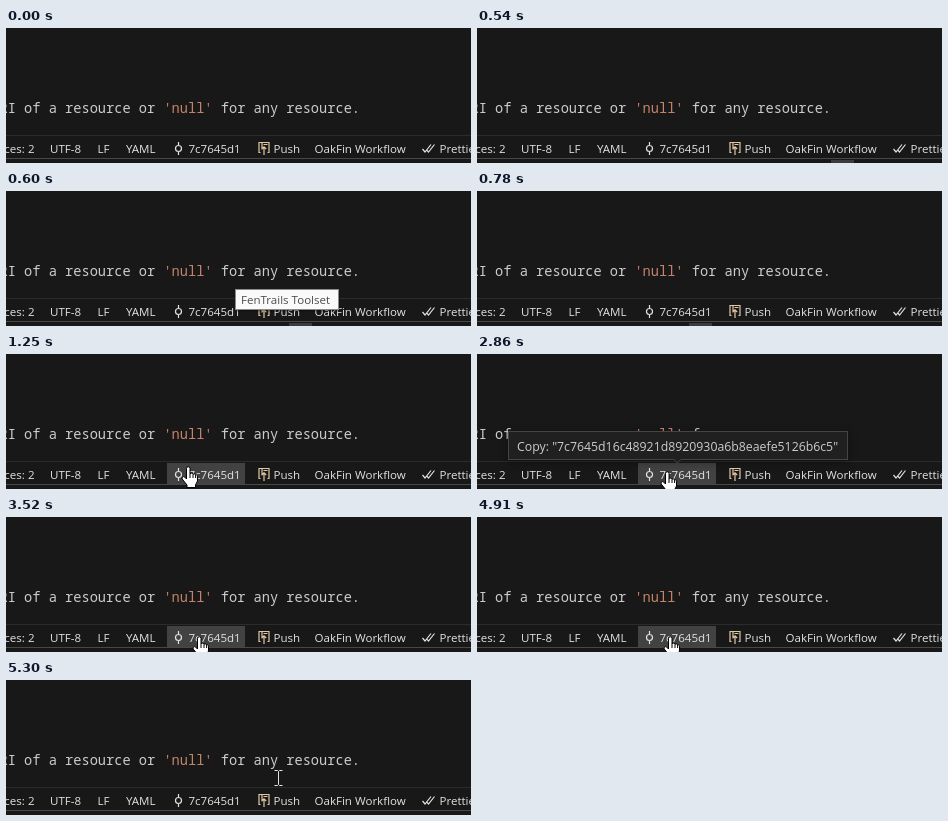
Recreate the animation shown at these times as an HTML page. Size 465x135 px, loop 5440 ms.

```html
<!DOCTYPE html>
<html lang="en">
<head>
<meta charset="utf-8">
<title>Status bar commit hash</title>
<style>
  html, body { margin: 0; width: 100%; height: 100%; overflow: hidden; background: #181818; }
  svg { display: block; }
  text { font: 11.55px "Open Sans", "Noto Sans", sans-serif; fill: #e2e2e2; white-space: pre; }
  .code { font: 13.67px "Noto Sans Mono", "DejaVu Sans Mono", monospace; fill: #ccc; }
  .str { fill: #c5836a; }
  .hash { font-size: 12.3px; fill: #ccc; }
  .line { fill: none; stroke: #e2e2e2; stroke-width: 1.2; }
  #copyTip rect { filter: drop-shadow(0 2px 4px rgba(0, 0, 0, .36)); }
</style>
</head>
<body>
<svg width="465" height="135" viewBox="0 0 465 135">
  <rect width="465" height="135" fill="#181818"/>
  <text class="code" x="-6.5" y="85">RI of a resource or <tspan class="str">'null'</tspan> for any resource.</text>

  <rect y="107" width="465" height="1" fill="#2b2b2b"/>
  <rect id="hover" x="161" y="109" width="78" height="21" fill="#424242"/>
  <rect y="130" width="465" height="1" fill="#484848"/>
  <rect id="slot" y="132" width="23" height="3" fill="#3c3c3c"/>

  <text x="28.5" y="125" text-anchor="end">Spaces: 2</text>
  <text x="44" y="125">UTF-8</text>
  <text x="91.5" y="125">LF</text>
  <text x="120" y="125">YAML</text>
  <text x="182.5" y="125">7c7645d1</text>
  <text x="267.5" y="125">Push</text>
  <text x="308.5" y="125">OakFin Workflow</text>
  <text x="433.5" y="125">Prettier</text>

  <g class="line">
    <path id="commit" d="M172.5 114v3.5M172.5 123.5v3.5M169.5 120.5a3 3 0 1 0 6 0a3 3 0 1 0-6 0"/>
    <path id="check" d="M167 121l3.5 3.5 7-8.5"/>
    <path d="M416.500 121l2.500 3 6-7.500M421 122.300l1.500 1.700 6-7.500"/>
    <path stroke="#e0c8a4" d="M254.500 124.500h-1.500v-10h10v10h-1.500M256 114.500v7M258 127v-8M255.800 121l2.200-2.200 2.200 2.200M257.500 116.500h4"/>
  </g>

  <g id="appTip">
    <rect x="230.5" y="100.5" width="103" height="20" fill="#000" opacity=".35"/>
    <rect x="229.5" y="98.5" width="103" height="20" fill="#fafafa" stroke="#8a8a8a"/>
    <text x="235" y="113" style="fill:#4c4c4c">FenTrails Toolset</text>
  </g>

  <g id="copyTip">
    <rect x="31.5" y="77.5" width="339" height="28" fill="#202020" stroke="#454545"/>
    <path d="M196.5 105l4 4 4-4" fill="#202020" stroke="#454545"/>
    <text class="hash" x="40" y="96.5">Copy: "7c7645d16c48921d8920930a6b8eaefe5126b6c5"</text>
  </g>

  <!-- Both cursors have their hot spot at 0,0 -->
  <g id="hand" stroke="#000" stroke-linejoin="round">
    <path fill="#fff" d="M-1.5 13V2.5a1.75 1.75 0 0 1 3.5 0V8a1.6 1.6 0 0 1 3 .4a1.6 1.6 0 0 1 2.7.6a1.2 1.2 0 0 1 1.8 1.2V15l-2 4v2.5H-1V19l-4.8-6a1.6 1.6 0 0 1 2.4-2z"/>
    <path fill="none" d="M2 8v4M5 8.500v3.500M7.600 9v3"/>
  </g>
  <path id="beam" class="line" style="stroke-width:1" d="M-3.500-7.500h3l1 1 1-1h3M.5-6.500v13M-3.500 7.500h3l1-1 1 1h3"/>
</svg>
<script>
const LOOP = 5440, ENTER = 1130;
const $ = id => document.getElementById(id);
const show = (id, on) => $(id).setAttribute("visibility", on ? "visible" : "hidden");
const move = (id, x, y) => $(id).setAttribute("transform", `translate(${x} ${y})`);

// Pointer moves: start, end, x, y
const moves = [
  [ENTER, 1250, 182, 112],
  [2460, 2860, 190, 117],
  [2980, 2980, 185, 105],
  [3120, 3520, 193, 119],
  [4910, 5300, 272, 98]
];

function pointer(t) {
  let x = 186, y = 125;
  for (const [from, to, endX, endY] of moves) {
    if (t < from) break;
    const k = t < to ? (t - from) / (to - from) : 1;
    x += (endX - x) * k;
    y += (endY - y) * k;
  }
  return [Math.round(x), Math.round(y)];
}

function draw(t) {
  const during = (a, b) => t >= a && t < b;
  const [x, y] = pointer(t);
  const inside = t >= ENTER, over = inside && y >= 105;
  move("hand", x, y);
  move("beam", x, y);
  show("hand", over);
  show("hover", over);
  show("beam", inside && !over);

  // The taskbar highlight slows down as it passes from icon to icon
  const icon = Math.floor(8.1 / (1 + (t - 540) / 60));
  move("slot", Math.round(188.300 + 23.700 * icon), 0);
  show("slot", during(540, 1050));

  show("appTip", during(600, 720));
  show("copyTip", during(2040, 3520));
  show("check", during(3600, 4170));
  show("commit", !during(3600, 4170));
}

const start = performance.now();
function tick() {
  draw((performance.now() - start) % LOOP);
  requestAnimationFrame(tick);
}
tick();
</script>
</body>
</html>
```
